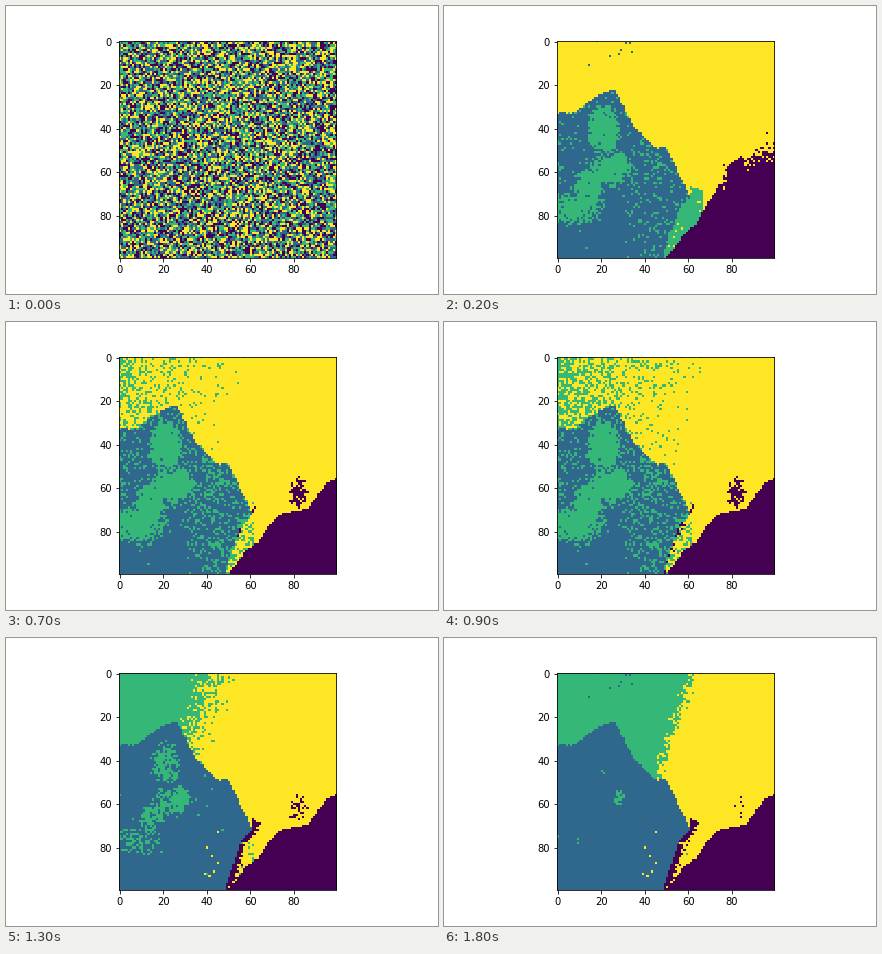
Write a matplotlib script that moves like this. It is 432x288 px and loops after 1.9 s.

```python
import numpy as np
import matplotlib.pyplot as plt
from matplotlib.animation import FuncAnimation

SIZE, FRAMES, LAST = 100, 38, 36
PURPLE, BLUE, GREEN, YELLOW = range(4)

rng = np.random.default_rng(7)
Y, X = np.mgrid[0:SIZE, 0:SIZE].astype(float)


def noise():
    return rng.standard_normal((SIZE, SIZE))


def ramp(i, a, b):
    """Smooth step from 0 at a to 1 at b."""
    t = np.clip((i - a) / (b - a), 0, 1)
    return t * t * (3 - 2 * t)


def line(v, *points):
    """Piecewise linear curve through (position, value) points."""
    return np.interp(v, *zip(*points))


def blob(cx, cy, rx, ry):
    r2 = ((X - cx) / rx) ** 2 + ((Y - cy) / ry) ** 2
    return np.exp(-0.6 * r2 ** 2)


def specks(x0, x1, y0, y1, share=0.025):
    inside = (X >= x0) & (X <= x1) & (Y >= y0) & (Y <= y1)
    return inside & (rng.random((SIZE, SIZE)) < share)


start = rng.integers(0, 4, (SIZE, SIZE))
sky_noise = np.clip(noise(), -2, 2)
rock_noise, gap_noise, edge_noise, dark_noise, clump_noise = (noise() for _ in range(5))

# Outlines of the landscape
ridge = line(X, (0, 33), (8, 32.5), (18, 25), (26, 22), (34, 38), (43, 48),
             (50, 49.5), (61, 72))
flank = line(Y, (72, 60.5), (77, 55.5), (99, 48))
slope = line(X, (50, 99), (58, 88.5), (63, 85), (68, 77.5), (74, 72), (86, 69.5),
             (95, 57.5), (99, 55.5))
fringe = 13 * np.exp(-((X - 85) / 13) ** 2)

rock = (Y + 0.3 * edge_noise >= ridge) & (X <= flank)
gap = (X > flank) & (X < 67) & (Y > 0.3 * X + 48.5)
dark = X >= 50

# Brightness of the rock face: grainy ground, plain hollows, bright patches
ground = 0.35 + 0.06 * (X > 30) - 0.45 * (blob(12, 96, 20, 12) + blob(24, 78, 5, 13))
face = np.maximum.reduce([
    ground,
    1.1 * blob(21, 41, 7.5, 11),
    1.1 * blob(24, 59, 9.5, 7.5),
    1.75 * blob(28, 57, 3.5, 5),
    1.05 * blob(14, 67, 6.5, 9),
    0.9 * blob(7, 77, 14, 8),
]) + 0.22 * rock_noise

spread = X + 0.35 * Y
clump = ((X - 82) / 4) ** 2 + ((Y - 62) / 6) ** 2
sky_specks = specks(14, 35, 0, 20)
rock_specks = specks(38, 45, 70, 97)


def labels(i):
    if i == 0:
        return start
    i = min(i, LAST)
    lift = 1.25 * (1 - ramp(i, 2, 9))
    late = ramp(i, 18, 36)

    # Green creeps over the sky from the left, first as grain, then as a front
    front = min(3.2 * i - 40, 62)
    width = ramp(i, 2, 9) * (2 + 25 / (1 + np.exp((i - 23.5) / 1.5)))
    img = np.where(spread + width * sky_noise < front, GREEN, YELLOW)
    if lift > 0.5 or late > 0.9:
        img[sky_specks] = BLUE

    # The valley joins the sky, with a dark seam growing along the flank
    lit = (gap_noise < 0.3 - 1.8 * lift + 1.7 * late) | ((X > 61) & (lift < 0.6))
    img[gap] = np.where(lit, YELLOW, GREEN)[gap]
    seam = 6.4 * ramp(i, 6, 30) - 3
    img[gap & (X - flank + 1.2 * edge_noise < seam)] = PURPLE

    level = 0.54 + 0.1 * lift + 0.95 * late
    img[rock] = np.where(face > level, GREEN, BLUE)[rock]
    if late > 0.3:
        img[rock_specks & rock] = YELLOW

    # Dark slope with a fringe that sinks early and a clump that thins out
    img[dark & (Y + 3 * lift * dark_noise * (X > 74) > slope - lift * fringe)] = PURPLE
    sparse = 2.2 * late - 2.6 * lift - 0.7
    img[(clump < 1.5) & (clump_noise > sparse + clump)] = PURPLE
    return img


plt.rcParams.update({"font.family": "DejaVu Sans", "font.size": 10})
fig, ax = plt.subplots(figsize=(6, 4), dpi=72)
fig.subplots_adjust(left=0.125, right=0.9, bottom=0.125, top=0.88)
picture = ax.imshow(start, cmap="viridis", vmin=0, vmax=3, interpolation="nearest")


def draw(i):
    picture.set_data(labels(i))
    return [picture]


anim = FuncAnimation(fig, draw, frames=FRAMES, interval=50, repeat=True,
                     repeat_delay=0, blit=False)
plt.show()
```
